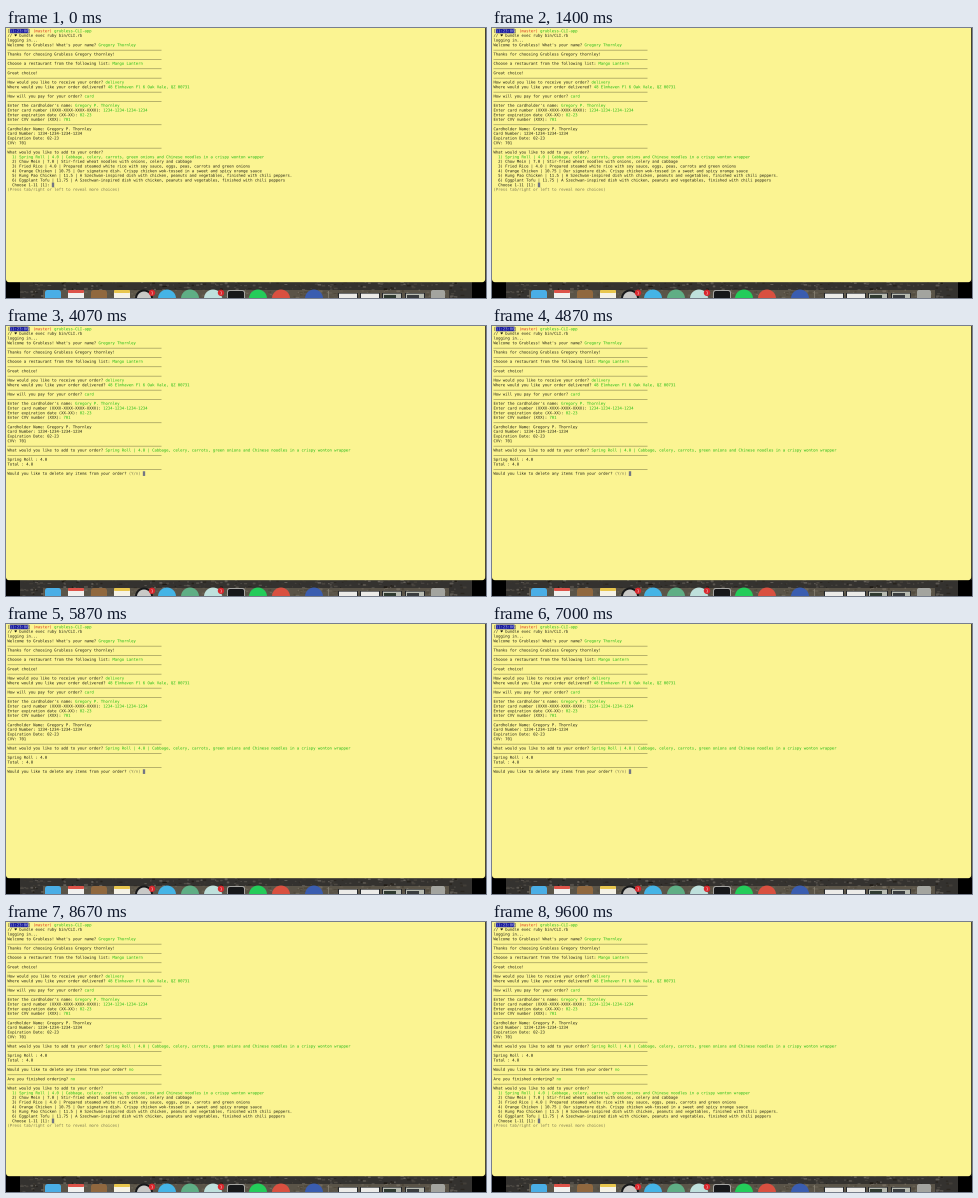
An HTML page with a canvas that plays this animation: 480 by 270 pixels, repeating every 9990 ms.

```html
<!DOCTYPE html>
<html lang="en">
<head>
<meta charset="utf-8">
<title>Terminal order</title>
<style>
html, body { margin: 0; width: 100%; height: 100%; overflow: hidden; background: #20201e; }
canvas { display: block; width: 480px; height: 270px; }
</style>
</head>
<body>
<canvas id="stage" width="480" height="270"></canvas>
<script>
const LOOP = 9990;
const SS = 4;                       // drawn large, then scaled down
const CW = 7 / 3, LH = 14 / 3;      // character cell
const LEFT = 1.5, BASE = 4.2;
const INK = '#1a1a10', GREEN = '#17b80f', GREY = '#77734f', RED = '#d9301a';

const view = document.getElementById('stage').getContext('2d');
const big = document.createElement('canvas');
big.width = 480 * SS;
big.height = 270 * SS;
const ctx = big.getContext('2d');

// "-" is a rule, "~" starts green text, "`" grey text, "^" is the cursor.
const intro = [
  '',
  '// ♥ bundle exec ruby bin/CLI.rb',
  'logging in...',
  "Welcome to Grubless! What's your name? ~Gregory Thornley",
  '-',
  'Thanks for choosing Grubless Gregory thornley!',
  '-',
  'Choose a restaurant from the following list: ~Mango Lantern',
  '-',
  'Great choice!',
  '-',
  'How would you like to receive your order? ~delivery',
  'Where would you like your order delivered? ~48 Elmhaven Fl 6 Oak Vale, QZ 00731',
  '-',
  'How will you pay for your order? ~card',
  '-',
  "Enter the cardholder's name: ~Gregory P. Thornley",
  'Enter card number (XXXX-XXXX-XXXX-XXXX): ~1234-1234-1234-1234',
  'Enter expiration date (XX-XX): ~02-23',
  'Enter CVV number (XXX): ~701',
  '-',
  'Cardholder Name: Gregory P. Thornley',
  'Card Number: 1234-1234-1234-1234',
  'Expiration Date: 02-23',
  'CVV: 701',
  '-'
];

const roll = 'Spring Roll | 4.0 | Cabbage, celery, carrots, green onions and Chinese noodles in a crispy wonton wrapper';
const spicy = 'A Szechwan-inspired dish with chicken, peanuts and vegetables, finished with chili peppers';
const askAdd = 'What would you like to add to your order?';
const askDelete = 'Would you like to delete any items from your order? ';
const askDone = 'Are you finished ordering? ';

const menu = typed => [
  askAdd,
  '~  1) ' + roll,
  '  2) Chow Mein | 7.0 | Stir-fried wheat noodles with onions, celery and cabbage',
  '  3) Fried Rice | 4.0 | Prepared steamed white rice with soy sauce, eggs, peas, carrots and green onions',
  '  4) Orange Chicken | 10.75 | Our signature dish. Crispy chicken wok-tossed in a sweet and spicy orange sauce',
  '  5) Kung Pao Chicken | 11.5 | ' + spicy + '.',
  '  6) Eggplant Tofu | 11.75 | ' + spicy,
  '  Choose 1-11 [1]: ' + typed + '^',
  '`(Press tab/right or left to reveal more choices)'
];
const confirm = (question, typed) => question + '`(Y/n) ' + typed + '^';

const order = [...intro, askAdd + ' ~' + roll, '-', 'Spring Roll : 4.0', 'Total : 4.0', '-'];
const kept = [...order, askDelete + '~no', '-'];
const done = [...kept, askDone + '~no', '-'];

const steps = [
  [0, [...intro, ...menu('')]],
  [3270, [...intro, ...menu('1')]],
  [3530, [...order, confirm(askDelete, '')]],
  [7270, [...order, confirm(askDelete, 'n')]],
  [7470, [...kept, confirm(askDone, '')]],
  [8470, [...kept, confirm(askDone, 'n')]],
  [8670, [...done, ...menu('')]]
];

function box(x, y, w, h, color, r = 0) {
  ctx.fillStyle = color;
  ctx.beginPath();
  ctx.roundRect(x, y, w, h, r);
  ctx.fill();
}

function disc(x, y, r, color) {
  ctx.fillStyle = color;
  ctx.beginPath();
  ctx.arc(x, y, r, 0, Math.PI * 2);
  ctx.fill();
}

// Placed cell by cell so the grid stays exact.
function write(text, col, row, color) {
  ctx.fillStyle = color;
  [...text].forEach((ch, i) => {
    if (ch !== ' ') ctx.fillText(ch, LEFT + (col + i) * CW, BASE + row * LH);
  });
}

function drawLine(line, row) {
  const y = BASE + row * LH;
  if (line === '-') {
    box(LEFT, y - 1, 66 * CW, 0.5, 'rgba(26,26,16,.6)');
    return;
  }
  let col = 0, color = INK;
  for (const part of line.split(/([~`^])/)) {
    if (part === '~') color = GREEN;
    else if (part === '`') color = GREY;
    else if (part === '^') box(LEFT + col * CW, y - 3.6, CW, LH, '#737684');
    else {
      write(part, col, row, color);
      col += part.length;
    }
  }
}

function drawPrompt() {
  box(LEFT + CW, 0.6, CW * 8, LH, '#1d1f9c');
  write('[', 0, 0, INK);
  write('11:23:06', 1, 0, '#b9bdf0');
  write(']', 9, 0, INK);
  write('(master)', 11, 0, RED);
  write('grubless-CLI-app', 20, 0, GREEN);
}

function drawDesk() {
  let seed = 7;
  const rand = () => (seed = seed * 16807 % 2147483647) / 2147483647;
  box(0, 250, 480, 20, '#000');
  box(14, 250, 452, 20, '#34322f');
  for (let i = 0; i < 420; i++) {
    const x = 14 + rand() * 448, y = 253 + rand() * 17, light = 25 + rand() * 75;
    box(x, y, 1 + rand() * 3, 0.7 + rand() * 1.3, `rgb(${light + 4},${light},${light - 6})`, 0.5);
  }
  box(37, 262, 406, 10, 'rgba(128,118,98,.5)');
}

function drawDock() {
  const tile = (x, color, w = 16) => box(x - w / 2, 262, w, 12, color, 2.5);
  const ball = (x, color) => disc(x, 270.5, 9, color);
  const badge = x => {
    disc(x, 264.8, 3.2, '#d8262c');
    write('1', (x - 1.1 - LEFT) / CW, (266.2 - BASE) / LH, '#fff');
  };

  tile(47, '#4aaee6');
  tile(70, '#f1f0ee');
  box(62, 262, 16, 3, '#dd5349', 1);
  tile(93, '#90683f');
  tile(116, '#f5f2e6');
  box(108, 262, 16, 3, '#e8c64e', 1);
  ball(138, '#17181a');
  disc(138, 270.5, 7, '#c9c9c7');
  ball(161, '#45b4e6');
  ball(184, '#5fae85');
  ball(207, '#bfe0dc');
  tile(230, '#a5a5a2', 18);
  box(222, 263, 16, 10, '#17181a', 2);
  ball(252, '#24cc5a');
  ball(275, '#d95040');
  ball(308, '#3a5db0');
  badge(146);
  badge(215);
  box(322, 263, 0.5, 7, '#a09a8c');

  for (const x of [342, 364, 386, 409]) {
    box(x - 10, 265, 20, 7, '#25272a');
    box(x - 9, 265.6, 18, 6, x < 380 ? '#ecebe8' : '#b9bcb2');
  }
  box(378, 267, 12, 3, '#2f3a30');
  box(401, 267, 12, 3, '#3a3d3f');
  box(425, 262, 14, 12, '#a3a49f', 2);
}

function draw(lines) {
  ctx.setTransform(SS, 0, 0, SS, 0, 0);
  ctx.font = '3.875px "DejaVu Sans Mono", monospace';
  ctx.textBaseline = 'alphabetic';
  drawDesk();
  box(0, 0, 479.2, 254.2, '#fbf492', [0, 0, 3, 3]);
  box(479.2, 0, 0.8, 254, '#25241c');
  drawPrompt();
  lines.forEach(drawLine);
  drawDock();
  view.imageSmoothingEnabled = true;
  view.imageSmoothingQuality = 'high';
  view.drawImage(big, 0, 0, 480, 270);
}

let shown = null;
const start = performance.now();

function tick() {
  const t = (performance.now() - start) % LOOP;
  const step = steps.findLast(s => s[0] <= t) || steps[0];
  if (step !== shown) {
    shown = step;
    draw(step[1]);
  }
  requestAnimationFrame(tick);
}
tick();
</script>
</body>
</html>
```
